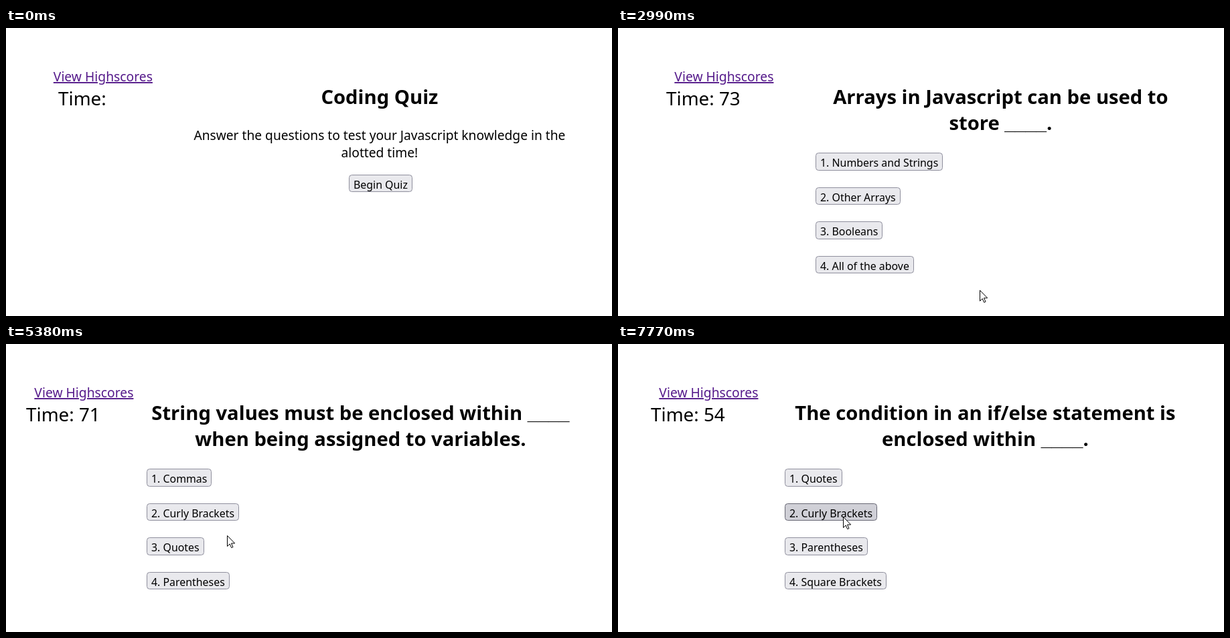
An HTML page that plays this animation: 905x432 px, repeating every 8000 ms.

```html
<!DOCTYPE html>
<html lang="en">
<head>
<meta charset="utf-8">
<title>Coding Quiz</title>
<style>
  html, body { margin: 0; width: 100%; height: 100%; overflow: hidden; background: #fff; }
  svg { display: block; width: 905px; height: 432px; font-family: "Noto Sans", sans-serif; font-weight: 500; }
  .link { font-size: 19.3px; fill: #551a8b; text-decoration: underline; text-underline-offset: 2px; }
  .time { font-size: 27.8px; }
  .title { font-size: 29.2px; font-weight: 700; }
  .blank { font: 700 28.2px "Liberation Sans", sans-serif; }
  .body { font-size: 19.2px; }
  .mid { text-anchor: middle; }
  .button text { font-size: 15.9px; font-weight: 400; }
  .button rect { fill: #e9e9ed; stroke: #8f8f9d; }
  .button.hover rect { fill: #d0d0d7; stroke: #676774; }
</style>
</head>
<body>
<svg id="stage" viewBox="0 0 905 432">
  <text id="link" class="link mid" y="80">View Highscores</text>
  <text id="time" class="time" y="116"></text>
  <g id="scenes"></g>
  <text id="verdict" class="body mid" y="413"></text>
  <path id="cursor" d="M.5.5V16.5L4.2 13 6.7 18.6 9 17.6 6.5 12H11.7Z" fill="#fff" stroke="#000"/>
</svg>
<script>
const LOOP = 8000;
const QUIZ_START = 990, WRONG_AT = 5960, PENALTY = 15;
const VERDICT_TIME = 1030;
const MOVE_TIME = 400;
const HOVER_LAG = 66;
const $ = id => document.getElementById(id);

const scenes = [
  {
    start: 0, timeX: 78, buttonX: 512, buttonY: 220,
    title: ["Coding Quiz"],
    body: ["Answer the questions to test your Javascript knowledge in the", "alotted time!"],
    buttons: ["Begin Quiz"]
  },
  {
    start: QUIZ_START, timeX: 78, buttonX: 307,
    title: ["Commonly used data types do NOT", "include:"],
    buttons: ["1. Strings", "2. Booleans", "3. Alerts", "4. Numbers"]
  },
  {
    start: 1960, timeX: 72, buttonX: 295, verdict: "true!",
    title: ["Arrays in Javascript can be used to", "store ____."],
    buttons: ["1. Numbers and Strings", "2. Other Arrays", "3. Booleans", "4. All of the above"]
  },
  {
    start: 4060, timeX: 30, buttonX: 210, verdict: "true!",
    title: ["String values must be enclosed within ____", "when being assigned to variables."],
    buttons: ["1. Commas", "2. Curly Brackets", "3. Quotes", "4. Parentheses"]
  },
  {
    start: WRONG_AT, timeX: 49, buttonX: 249, verdict: "false!",
    title: ["The condition in an if/else statement is", "enclosed within ____."],
    buttons: ["1. Quotes", "2. Curly Brackets", "3. Parentheses", "4. Square Brackets"]
  }
];

// Pointer stops: arrival time, x, y
const stops = [
  [400, 592, 374], [800, 558, 236], [1390, 542, 311], [1950, 343, 293], [2650, 540, 393],
  [3590, 414, 264], [3970, 402, 352], [4390, 392, 303], [5380, 330, 287], [5710, 338, 256],
  [6160, 338, 256], [6240, 349, 282], [6570, 512, 415], [7770, 336, 259]
];

function add(parent, tag, attrs, text = "") {
  const node = document.createElementNS("http://www.w3.org/2000/svg", tag);
  for (const key in attrs) node.setAttribute(key, attrs[key]);
  node.textContent = text;
  return parent.appendChild(node);
}

function addTitle(parent, line, y) {
  const node = add(parent, "text", { class: "title mid", y });
  for (const part of line.split(/(_+)/))
    add(node, "tspan", part.startsWith("_") ? { class: "blank" } : {}, part);
}

function addButton(parent, label, x, top) {
  const node = add(parent, "g", { class: "button" });
  const y = Math.round(top), height = Math.round(top + 26.4) - y;
  const box = add(node, "rect", { x: x + .5, y: y + .5, height: height - 1, rx: 4 });
  const text = add(node, "text", { x: x + 7, y: y + 21 }, label);
  const width = Math.round(text.getComputedTextLength() + 14);
  box.setAttribute("width", width - 1);
  const contains = p => p && p.x >= x && p.x < x + width && p.y >= y && p.y < y + height;
  return { node, contains };
}

function build(scene) {
  const { title, body = [], buttons, buttonX, buttonY = 187.2 } = scene;
  scene.group = add($("scenes"), "g", {});
  scene.panel = add(scene.group, "g", {});
  title.forEach((line, i) => addTitle(scene.panel, line, 114 + 39 * i));
  body.forEach((line, i) => add(scene.panel, "text", { class: "body mid", y: 168 + 26 * i }, line));
  scene.hits = buttons.map((label, i) => addButton(scene.group, label, buttonX, buttonY + 51.5 * i));
}

function secondsLeft(t) {
  if (t < QUIZ_START) return "";
  return 75 - Math.floor((t - QUIZ_START) / 1000) - (t < WRONG_AT ? 0 : PENALTY);
}

function pointerAt(t) {
  if (t < stops[0][0]) return null;
  const i = stops.findIndex(stop => stop[0] > t);
  if (i < 0) return { x: stops.at(-1)[1], y: stops.at(-1)[2] };
  const [left, x0, y0] = stops[i - 1], [arrive, x1, y1] = stops[i];
  const depart = Math.max(left, arrive - MOVE_TIME);
  const k = Math.max(0, (t - depart) / (arrive - depart));
  const ease = k * k * (3 - 2 * k);
  return { x: x0 + (x1 - x0) * ease, y: y0 + (y1 - y0) * ease };
}

function draw(t) {
  const scene = scenes.findLast(s => s.start <= t);
  scenes.forEach(s => s.group.style.display = s === scene ? "" : "none");

  // Both columns are centred relative to the middle of the timer text.
  const time = $("time");
  time.setAttribute("x", scene.timeX);
  time.textContent = `Time: ${secondsLeft(t)}`.trim();
  const middle = scene.timeX + time.getComputedTextLength() / 2;
  $("link").setAttribute("x", middle + 31);
  scene.panel.setAttribute("transform", `translate(${middle + 444} 0)`);
  $("verdict").setAttribute("x", middle + 444);
  $("verdict").textContent = t < scene.start + VERDICT_TIME ? scene.verdict || "" : "";

  const tip = pointerAt(t), late = pointerAt(t - HOVER_LAG);
  $("cursor").style.display = tip ? "" : "none";
  if (tip) $("cursor").setAttribute("transform", `translate(${Math.round(tip.x)} ${Math.round(tip.y)})`);
  for (const { node, contains } of scene.hits)
    node.classList.toggle("hover", Boolean(contains(tip) || contains(late)));
}

scenes.forEach(build);
const begin = performance.now();
function tick() {
  draw((performance.now() - begin) % LOOP);
  requestAnimationFrame(tick);
}
tick();
</script>
</body>
</html>
```
